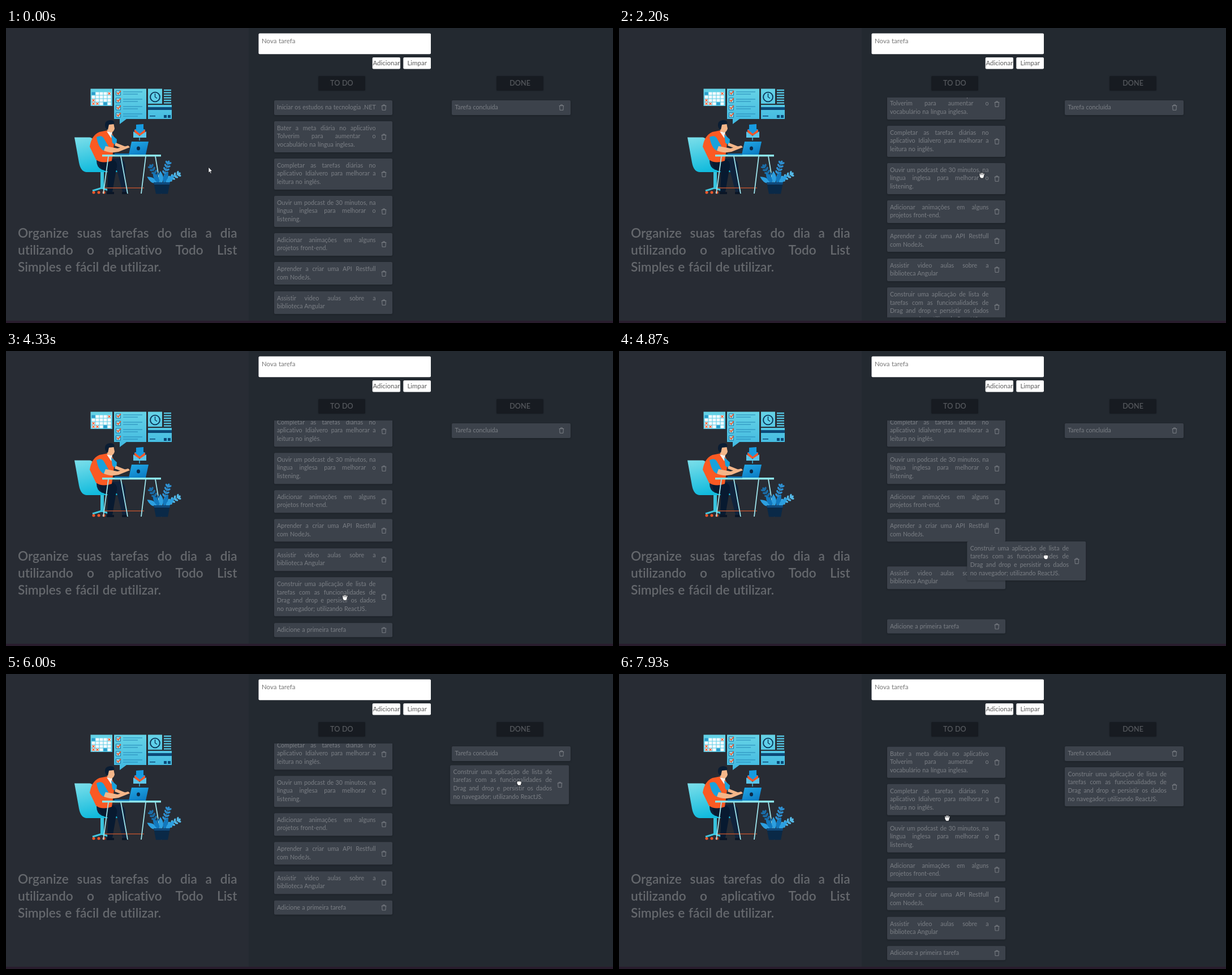
An HTML page that plays this animation: 1073x522 px, repeating every 8000 ms.

```html
<!DOCTYPE html>
<html lang="pt">
<head>
<meta charset="utf-8">
<title>Todo List</title>
<style>
html, body { margin: 0; width: 100%; height: 100%; overflow: hidden; background: #232930; }
body { font: 10.7px Lato, sans-serif; word-spacing: .5px; font-variant-ligatures: none; }
#stage { position: relative; width: 1073px; height: 522px; overflow: hidden; background: #232930; }
#stage div, #stage svg { position: absolute; }
#stage .line { position: static; white-space: nowrap; height: 14.55px; line-height: 14.55px; }
#stage .fill { text-align-last: justify; }
#side { left: 0; top: 0; width: 429px; height: 522px; background: #282c34; }
#foot { left: 0; top: 518px; width: 1073px; height: 4px; background: #291d2d; }
#lead { left: 21px; top: 347.8px; width: 387.5px; font-size: 22.6px; font-weight: 600; word-spacing: 1px; color: #65686d; }
#lead .line { height: 30.2px; line-height: 30.2px; }
.label { font-size: 11.5px; white-space: nowrap; color: #5c5c5c; }
.btn { top: 52px; width: 48.8px; line-height: 20.2px; text-align: center; }
.head { top: 85px; width: 83.6px; height: 26px; line-height: 25px; border-radius: 2px; background: #171b21; color: #54575c; font-size: 12.6px; font-weight: 600; text-align: center; box-shadow: 0 0 2px #1c2027; }
#list { left: 470px; top: 122.5px; width: 217px; height: 389.5px; overflow: hidden; }
#roll { left: 0; top: 0; width: 217px; height: 0; }
.card { width: 209.5px; border-radius: 2px; background: #3c424b; color: #7b7f85; box-shadow: 0 1px 3px rgba(10, 13, 18, .3); }
.text { left: 5.5px; top: 4.9px; width: 174.5px; }
.bin { left: 189px; width: 10px; height: 11px; }
#cursor { left: -10px; top: -10px; width: 20px; height: 20px; overflow: visible; }
</style>
</head>
<body>
<div id="stage">
  <div id="side"></div>

  <svg width="1073" height="330" viewBox="0 0 1073 330">
    <defs>
      <linearGradient id="aqua" x2=".3" y2="1"><stop stop-color="#7ddfea"/><stop offset="1" stop-color="#12bbdd"/></linearGradient>
      <linearGradient id="sky" x2="0" y2="1"><stop stop-color="#66d3e6"/><stop offset="1" stop-color="#40b8e0"/></linearGradient>
      <linearGradient id="blue" x2=".5" y2="1"><stop stop-color="#23a9e6"/><stop offset="1" stop-color="#0d7fc6"/></linearGradient>
      <symbol id="bin" viewBox="0 0 11 12" overflow="visible">
        <path d="M.8 2.8H10.2M3.8 2.6V.9H7.2V2.6M1.8 3L2.3 11.3H8.7L9.2 3" fill="none" stroke="#8a8e94" stroke-width=".9" stroke-linejoin="round"/>
      </symbol>
    </defs>

    <g fill="#fff">
      <rect x="446.5" y="9.5" width="304.5" height="36.7" rx="2"/>
      <rect x="647.7" y="52" width="49.3" height="20.6" rx="2"/>
      <rect x="702.3" y="52" width="48.7" height="20.6" rx="2"/>
    </g>

    <!-- panels -->
    <path d="M149.5 107.5H188V138H149.5ZM191 107.5H248V161H213L201 170V161H191ZM251 107.5H276V134H251ZM251 136H293V161H251Z" fill="url(#sky)"/>
    <path d="M251 140H293V145H251ZM254 155H264V156.5H254ZM279 154H284V159H279ZM286 154H291V159H286Z" fill="#0c4a78"/>
    <circle cx="263.5" cy="122" r="8.4" fill="#5fd0ea" stroke="#0b3658" stroke-width="1.9"/>
    <path d="M263.5 116V122L267 124.5" fill="none" stroke="#0b3658" stroke-width="1.4"/>
    <g id="marks"></g>

    <!-- mail -->
    <path d="M225 181L236 173L248 181V190H225Z" fill="#0b3658"/>
    <path d="M227 180H246V190H227Z" fill="#f4572a"/>
    <path d="M225 183L236 191L248 183V194H225Z" fill="#5cc6ea"/>
    <path d="M230 171L243 170V179H246L236.5 187L227 179H230Z" fill="#179be0"/>
    <path d="M236 194V199" stroke="#3fb8e0" stroke-width="1.5"/>

    <!-- chair -->
    <path d="M167 252H173V285H167Z" fill="#39c3dd"/>
    <path d="M153 288L169 283L184 288" fill="none" stroke="#41c7df" stroke-width="3"/>
    <path d="M155 291H183" stroke="#f4572a" stroke-width="5" stroke-linecap="round" stroke-dasharray="0 9"/>
    <path d="M121 193.5H148Q157 195 161 212L170 244H198Q203 250 197 255H142Q132 254 129 238Z" fill="url(#aqua)"/>

    <!-- worker -->
    <path d="M160 234L202 230Q212 236 211 248L213 290H206L196 252L170 251Q160 247 160 234Z" fill="#10233c"/>
    <path d="M165 237L190 233Q199 238 195 250L188 290H179L180 254Q166 252 165 237Z" fill="#081a30"/>
    <path d="M178 290H191V294H178ZM205 290H218L214 294H205Z" fill="#0b1626"/>
    <path d="M148 210Q151 190 165 184L180 181Q194 188 191 205L187 235Q170 241 159 233Z" fill="#fb5a23"/>
    <path d="M178 183L188 184L186 195Z" fill="#f7f2ee"/>
    <path d="M160 193Q170 188 174 197L181 209L176 218Q164 216 160 193ZM186 188L196 197L195 208L188 203Z" fill="#18a2dc"/>
    <path d="M176 209L197 213L216 208L219 211L199 219Q184 222 173 217ZM194 203L214 211L208 214L192 208Z" fill="#f4b689"/>
    <path d="M177 168H190L192 178Q190 185 185 185L179 182Z" fill="#f4b689"/>
    <path d="M175 173Q174 164 184 163Q193 163 191 170L182 171L180 180Q176 179 175 173Z" fill="#0a1d33"/>

    <!-- desk -->
    <path d="M174 283H244" stroke="#b4502f" stroke-width="1.6"/>
    <path d="M181 227L172 293M203 227L215 293M247 227L239 293M264 227L275 293" stroke="#9fe6ee" stroke-width="1.8"/>
    <path d="M170 224H274V227.5H170Z" fill="#8ce5ec"/>
    <path d="M222 201H252L247 224H217Z" fill="url(#blue)"/>
    <path d="M192 222H218V224.5H192Z" fill="#0d6fae"/>
    <ellipse cx="234" cy="213" rx="3" ry="3.6" fill="#0b2947"/>

    <g id="plant"></g>
    <path d="M261 273H290L286 293.5H265Z" fill="#0a2947"/>
    <path d="M261 273H290L289.3 277H262Z" fill="#0f4a7c"/>
  </svg>

  <div id="lead">
    <div class="line fill">Organize suas tarefas do dia a dia</div>
    <div class="line fill">utilizando o aplicativo Todo List</div>
    <div class="line">Simples e fácil de utilizar.</div>
  </div>

  <div class="label" style="left:452px;top:14.5px;line-height:15px;color:#777">Nova tarefa</div>
  <div class="label btn" style="left:648px">Adicionar</div>
  <div class="label btn" style="left:702.3px">Limpar</div>
  <div class="head" style="left:551.6px">TO DO</div>
  <div class="head" style="left:866.8px">DONE</div>
  <div id="list"><div id="roll"></div></div>
  <div id="foot"></div>
  <svg id="cursor" viewBox="-10 -10 20 20" fill="#fff" stroke-linecap="round" stroke-linejoin="round"></svg>
</div>

<script>
const LOOP = 8000, STEP = LOOP / 120;
const PAD = 11, LINE = 14.55, GAP = 11.35;
const $ = id => document.getElementById(id);

// Easing of t across the span from a to b
const part = (t, a, b) => Math.min(1, Math.max(0, (t - a) / (b - a)));
const smooth = (t, a, b) => { const p = part(t, a, b); return p * p * (3 - 2 * p); };
const out = (t, a, b) => 1 - (1 - part(t, a, b)) ** 2;
const bump = (t, a, b) => Math.sin(Math.PI * part(t, a, b));
const mix = (a, b, k) => a + (b - a) * k;
const place = (el, x, y) => { el.style.transform = `translate(${x}px, ${y}px)`; };

// Calendar, checklist and text rows
function drawMarks() {
  let s = '';
  for (let i = 0; i < 20; i++) {
    const x = 151.5 + i % 5 * 7, y = 113.5 + (i / 5 | 0) * 6;
    s += `<path d="M${x} ${y}h6v5h-6z" fill="${i % 18 ? '#f4fafc' : '#2c9ccb'}"/>`;
    if (i % 6 === 4 || i === 15)
      s += `<path d="M${x + 1} ${y + .5}l4 4m0 -4l-4 4" stroke="#f4572a" stroke-width="1.2"/>`;
  }
  for (let y = 115; y < 160; y += 13)
    s += `<path d="M194.5 ${y - 4}h8v8h-8z" fill="#8fe0ee" stroke="#1b6c9c"/>` +
      `<path d="M196 ${y - 1}l2.3 2.8l4.5 -5.5" fill="none" stroke="#f4572a" stroke-width="1.8"/>` +
      `<path d="M207 ${y - 2}h34M207 ${y + 2}h26" stroke="#2487b8" stroke-width="1.2"/>`;
  for (let y = 110; y < 134; y += 4.5)
    s += `<path d="M279 ${y}h13" stroke="#55c6e3" stroke-width="2.4"/>`;
  $('marks').innerHTML = s;
}

// Stems with paired round leaves around a fan of broad leaves
function drawPlant() {
  let s = '';
  const stem = (turn, size, color) => {
    s += `<g transform="translate(275 275) rotate(${turn})" fill="${color}"><path d="M0 0V${-size}" stroke="${color}"/>`;
    for (let y = size; y > size * .4; y -= 6)
      for (const side of [-1, 1])
        s += `<ellipse cx="${side * 3.6}" cy="${-y}" rx="3.3" ry="1.8" transform="rotate(${side * -40} 0 ${-y})"/>`;
    s += `<ellipse cy="${-size - 3}" rx="2" ry="3.5"/></g>`;
  };
  stem(-32, 33, '#1a6da8');
  stem(18, 36, '#2f8fd0');
  stem(61, 32, '#55b9e6');
  for (let i = 0; i < 5; i++)
    s += `<path transform="translate(${268 + i * 3.5} 275) rotate(${i * 26 - 58})" d="M0 0Q-8 -10 0 -22Q8 -10 0 0Z" fill="${i % 2 ? '#1278bd' : '#2c9fe0'}"/>`;
  $('plant').innerHTML = s;
}

// Cursor shapes: an arrow, and hands made from four finger lengths
function drawCursors() {
  const hand = (kind, lengths, splay) => {
    const fingers = lengths.map((n, i) => `M${i * 1.7 - 2.2} 1l${(i - 1.5) * splay} ${-n}`).join('');
    const d = `M-3.2 .5L-1.4 4H2L3.2 .5Z${fingers}`;
    return `<g data-kind="${kind}"><path d="${d}" stroke="#15181d" stroke-width="2.8"/><path d="${d}" stroke="#fff" stroke-width="1.5"/></g>`;
  };
  $('cursor').innerHTML =
    '<path data-kind="arrow" d="M-3 -5.5V4L-.9 2.2L.7 5.5L2.2 4.8L.7 1.6H3.6Z" stroke="#15181d" stroke-width=".7"/>' +
    hand('hand', [3.6, 5, 5, 3.6], .7) + hand('point', [5.5, 2, 1.8, 1.4], 0) + hand('fist', [2.4, 2.8, 2.8, 2.3], .1);
}

function addCard(parent, text, x, y) {
  const lines = text.split('/'), height = lines.length * LINE + PAD;
  const el = document.createElement('div');
  el.className = 'card';
  el.style.cssText = `left:${x}px;top:${y}px;height:${height}px`;
  el.innerHTML = '<div class="text">' +
    lines.map((s, i) => `<div class="line${i < lines.length - 1 ? ' fill' : ''}">${s}</div>`).join('') +
    `</div><svg class="bin" style="top:${height / 2 - 5.5}px"><use href="#bin"/></svg>`;
  parent.append(el);
  return { el, size: height + GAP };
}

const movedText = 'Construir uma aplicação de lista de/tarefas com as funcionalidades de/Drag and drop e persistir os dados/no navegador; utilizando ReactJS.';
const tasks = [
  'Iniciar os estudos na tecnologia .NET',
  'Bater a meta diária no aplicativo/Tolverim para aumentar o/vocabulário na língua inglesa.',
  'Completar as tarefas diárias no/aplicativo Idialvero para melhorar a/leitura no inglês.',
  'Ouvir um podcast de 30 minutos, na/língua inglesa para melhorar o/listening.',
  'Adicionar animações em alguns/projetos front-end.',
  'Aprender a criar uma API Restfull/com NodeJs.',
  'Assistir video aulas sobre a/biblioteca Angular',
  movedText,
  'Adicione a primeira tarefa'
];
let listTop = 5.5;
const cards = tasks.map(text => {
  const card = addCard($('roll'), text, 3.5, listTop);
  listTop += card.size;
  return card;
});
const [above, taken, below] = cards.slice(-3);
addCard($('stage'), 'Tarefa concluída', 788, 128);
const drag = addCard($('stage'), movedText, 0, 0).el;
$('stage').append($('cursor'));
drawMarks();
drawPlant();
drawCursors();

// Mouse moves: start, end, target x and y, sideways bow
const home = [361, 252];
const hops = [
  [300, 1070, 681, 252, 12],
  [1140, 1530, 618, 251, 0],
  [2000, 2420, 668, 272, 0],
  [3740, 4200, 592, 464, 5],
  [4200, 4340, 599, 436, 0],
  [4540, 5270, 923, 202, 33],
  [5270, 5600, 911, 186, 0],
  [5800, 5930, 907, 192, 0],
  [6540, 7400, 528, 368, -45],
  [7400, 7935, 580, 255, -30]
];
function mouse(t) {
  let [x, y] = home;
  for (const [a, b, x2, y2, bow] of hops) {
    if (t < a) break;
    const s = smooth(t, a, b), dx = x2 - x, dy = y2 - y;
    const side = 4 * s * (1 - s) * bow / Math.hypot(dx, dy);
    x += dx * s - dy * side;
    y += dy * s + dx * side;
  }
  return [x, y];
}

const GRAB = 4550, DROP = 5850;
const inside = (x, y, left, bottom) => x > left && x < left + 210 && y > 122 && y < bottom;
function cursorKind(t, x, y) {
  if (t > GRAB && t < DROP + 280) return 'fist';
  if (inside(x, y, 473.5, 512)) return Math.abs(x - 667.5) < 6 ? 'point' : 'hand';
  return inside(x, y, 788, 234) ? 'hand' : 'arrow';
}

function draw(now) {
  const t = Math.floor(now % LOOP / STEP + .15) * STEP;
  const [x, y] = mouse(t);
  place($('cursor'), x, y);
  const kind = cursorKind(t, x, y);
  for (const shape of $('cursor').children)
    shape.style.display = shape.dataset.kind === kind ? '' : 'none';

  const scroll = 58 * out(t, 1670, 1930) + 58.7 * out(t, 2940, 3470) - taken.size * out(t, 6210, 6400);
  place($('roll'), 0, -scroll);
  place(above.el, 0, 32 * bump(t, 4730, 5000));
  place(below.el, 0, -taken.size * smooth(t, 4830, 5040));

  // The lifted card trails the mouse a little, then settles into its slot
  const lifted = t > GRAB, [cx, cy] = mouse(t - 20), k = smooth(t, DROP, 6130);
  taken.el.style.opacity = +!lifted;
  drag.style.opacity = +lifted;
  place(drag, mix(cx - 125.5, 788, k), mix(cy - 35, 165, k));
  requestAnimationFrame(draw);
}
requestAnimationFrame(draw);
</script>
</body>
</html>
```
